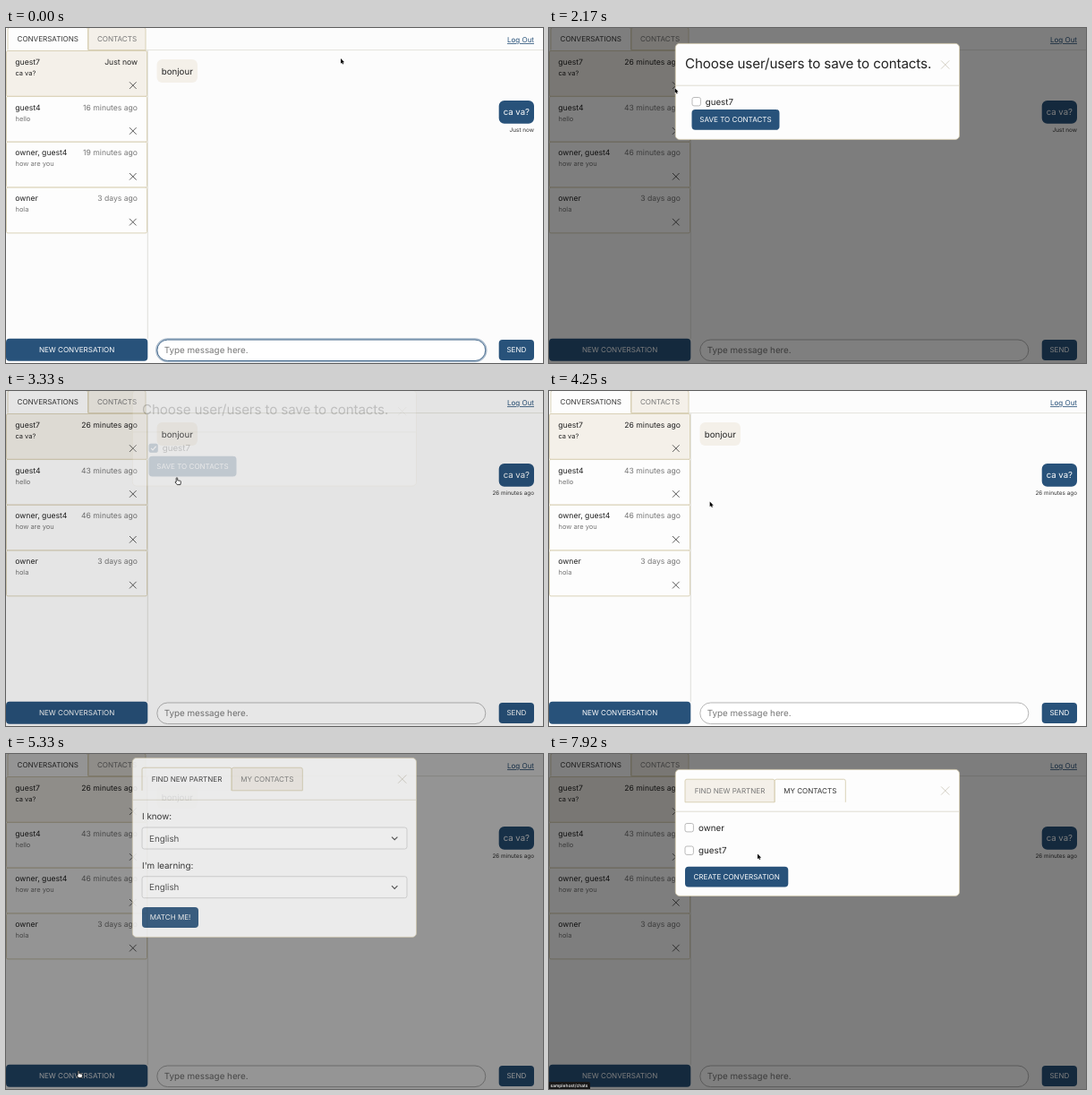
Animation, 600 px wide and 374 px high, one loop 8 s. Source, as an HTML page:

```html
<!DOCTYPE html>
<html lang="en">
<head>
<meta charset="utf-8">
<title>Chat</title>
<style>
  html, body { margin: 0; width: 100%; height: 100%; overflow: hidden; background: #fcfcfc; }
  svg { display: block; width: 100vw; height: 100vh; }
  text { font-family: Inter, "Open Sans", sans-serif; text-rendering: geometricPrecision; white-space: pre; }
</style>
</head>
<body>
<svg id="stage" viewBox="0 0 600 374"></svg>
<script>
const BLUE = '#28527a', BEIGE = '#f4f0e9', TAN = '#d6cdb0', WHITE = '#fdfdfd';
const INK = '#222', GREY = '#777';

// Markup helpers
const text = (x, y, size, str, fill = INK, extra = '') =>
  `<text x="${x}" y="${y}" font-size="${size}" fill="${fill}" ${extra}>${str}</text>`;
const END = 'text-anchor="end"', MIDDLE = 'text-anchor="middle"';
const box = (x, y, w, h, r, fill, stroke = 'none', extra = '') =>
  `<rect x="${x}" y="${y}" width="${w}" height="${h}" rx="${r}" fill="${fill}" stroke="${stroke}" ${extra}/>`;
const path = (d, stroke, width = 0.8, fill = 'none', extra = '') =>
  `<path d="${d}" stroke="${stroke}" stroke-width="${width}" fill="${fill}" ${extra}/>`;
const group = (id, body) => `<g id="${id}">${body}</g>`;
const cross = (x, y, r, color) =>
  path(`M${x - r} ${y - r}l${2 * r} ${2 * r}m0 ${-2 * r}l${-2 * r} ${2 * r}`, color);
const button = (x, y, w, h, label) =>
  box(x, y, w, h, 4, BLUE) + text(x + w / 2, y + h / 2 + 2.9, 8.05, label, '#fff', MIDDLE);
const checkbox = (x, y) => box(x, y, 9.4, 9.4, 2, '#fff', '#aaa', 'stroke-width=".8"');

function tab(x, y, w, h, label, active) {
  const outline = `M${x} ${y + h}V${y + 2}q0 -2 2 -2H${x + w - 2}q2 0 2 2V${y + h}`;
  return path(outline + (active ? '' : 'z'), TAN, 0.9, active ? WHITE : BEIGE) +
    text(x + w / 2, y + h / 2 + 2.9, 8.05, label, active ? '#333' : GREY, MIDDLE);
}

function conversation(i, name, message, before, after) {
  const y = 25.5 + i * 50.85, on = i === 0;
  const age = (cls, label) =>
    text(147, y + 15.2, 8.6, label, on ? INK : GREY, `${END} class="${cls}"`);
  return box(0.5, y, 157, 50.85, 1.5, on ? BEIGE : WHITE, TAN, 'stroke-width=".9"') +
    text(10.3, y + 15.2, 8.65, name) +
    text(10.5, y + 27.2, 7.45, message, on ? INK : GREY) +
    age('before', before) + age('after', after) +
    cross(141.8, y + 38.6, 3.8, '#333');
}

const page =
  box(0, 0, 600, 374, 0, '#fcfcfc') +
  path('M156 24.6H600', '#dedcd4') +
  path('M158.3 25V347', '#d9d8d2') +
  tab(2, -0.5, 89.5, 25, 'CONVERSATIONS', true) +
  tab(92, -0.5, 64, 25, 'CONTACTS', false) +
  text(590, 16, 8, 'Log Out', BLUE, END + ' text-decoration="underline"') +
  conversation(0, 'guest7', 'ca va?', 'Just now', '26 minutes ago') +
  conversation(1, 'guest4', 'hello', '16 minutes ago', '43 minutes ago') +
  conversation(2, 'owner, guest4', 'how are you', '19 minutes ago', '46 minutes ago') +
  conversation(3, 'owner', 'hola', '3 days ago', '3 days ago') +
  box(168.5, 35, 45.5, 26, 6, BEIGE) + text(173.8, 51.5, 9.7, 'bonjour') +
  box(550.7, 81, 39.3, 25.8, 6, BLUE) + text(570.3, 97.3, 9.6, 'ca va?', '#fff', MIDDLE) +
  text(590, 116, 6.4, 'Just now', '#333', END + ' id="sentNow"') +
  text(590, 116, 6.4, '26 minutes ago', '#333', END + ' id="sentAgo"') +
  button(0, 346.8, 158.3, 25, 'NEW CONVERSATION') +
  box(168.8, 348, 367, 23.6, 11.8, '#fff', '#b5b5b5') +
  group('focus',
    box(168.3, 347.5, 368, 24.6, 12.3, 'none', '#a9bacb', 'stroke-width="2.4"') +
    box(168.9, 348.1, 366.8, 23.4, 11.7, '#fff', BLUE, 'stroke-width=".8"')) +
  text(176.8, 363.4, 9.8, 'Type message here.', GREY) +
  button(550.7, 348, 39.3, 23, 'SEND');

const frame = h =>
  box(141.3, 17.4, 317.2, h, 4.5, WHITE, TAN, 'stroke-width=".8"') +
  path('M141.5 64.2H458.3', '#d9d5c6') + cross(442.7, 41, 4.6, '#c9c4b6');

const saveDialog = frame(107) +
  text(152, 44.6, 15.2, 'Choose user/users to save to contacts.', INK, 'letter-spacing="-.13"') +
  checkbox(160, 77.5) +
  group('checked', box(159.7, 77.2, 10, 10, 2, BLUE) +
    path('M162 82.3l2 2 3.6 -4.2', '#fff', 1.2)) +
  text(174.8, 85.7, 9.7, 'guest7') +
  button(159.5, 91, 98, 22.8, 'SAVE TO CONTACTS');

const select = y => box(152, y, 296, 24, 2.5, '#fff', '#ccc', 'stroke-width=".8"') +
  text(160, y + 15.6, 9.8, 'English', '#444') + path(`M431 ${y + 10.5}l3.2 3.2 3.2 -3.2`, '#444', 1.1);

const dialogTabs = first =>
  tab(152, 28.2, 100, 25.6, 'FIND NEW PARTNER', first) +
  tab(252.3, 28.2, 79, 25.6, 'MY CONTACTS', !first);

const contactRow = (y, name) => checkbox(152, y) + text(167, y + 8.4, 9.8, name);

const newDialog =
  group('partner', frame(200) + dialogTabs(true) +
    text(152, 86, 9.8, 'I know:') + select(95) +
    text(152, 140.7, 9.8, 'I\'m learning:') + select(149.7) +
    button(152, 184, 63, 23, 'MATCH ME!')) +
  group('contacts', frame(141) + dialogTabs(false) +
    contactRow(77.5, 'owner') + contactRow(103, 'guest7') +
    button(152, 125.7, 115.3, 22.8, 'CREATE CONVERSATION'));

const cursor =
  group('arrow', path('M0 0V5.7L1.3 4.5 2.2 6.5 3.2 6 2.3 4.2H4.1z', '#fff', 0.8, '#000',
    'paint-order="stroke"')) +
  group('hand', path('M-.8 4.6V.5a.75 .75 0 0 1 1.5 0V2.8L3.6 3.3q.9 .2 .8 1.2L3.9 7.6H.3L-1.9 5.1q-.2 -1.1 1.1 -.5z',
    '#111', 0.8, '#fff'));

const stage = document.getElementById('stage');
stage.innerHTML = page +
  box(0, 0, 600, 374, 0, '#000', 'none', 'id="shade"') +
  group('save', saveDialog) + group('create', newDialog) +
  group('status', box(-3, 366, 49, 12, 2, '#181818') +
    text(1.6, 372, 4.9, 'samplehost/chats', '#fff', 'font-weight="500"')) +
  group('cursor', cursor);

const el = id => document.getElementById(id);
const show = (node, on) => { node.style.display = on ? '' : 'none'; };
const clamp = v => Math.min(1, Math.max(0, v));

// cubic-bezier(0, 0, .58, 1)
function easeOut(x) {
  let lo = 0, hi = 1;
  for (let i = 0; i < 20; i++) {
    const s = (lo + hi) / 2;
    if (1.74 * s * s - 0.74 * s ** 3 < x) lo = s; else hi = s;
  }
  return 3 * lo * lo - 2 * lo ** 3;
}

// Fades in 250 ms, slides in 500 ms; returns the opacity
function dialog(id, t, open, close) {
  const part = (from, span) => clamp((t - from) / span);
  const alpha = part(open, 250) - part(close, 250);
  const shift = -31.7 * (1 - easeOut(part(open, 500)) + easeOut(part(close, 500)));
  const node = el(id);
  show(node, alpha > 0);
  node.setAttribute('opacity', alpha);
  node.setAttribute('transform', `translate(0 ${shift})`);
  return alpha;
}

// Pointer stops: time, x, y
const stops = [
  [0, 374, 34], [85, 374, 34], [670, 25, 42], [750, 25, 42], [1250, 29, 38], [1920, 29, 38],
  [2165, 140.5, 67], [2420, 164, 82], [2750, 164, 82], [3080, 191, 97], [4085, 191, 97],
  [4915, 81, 354], [5330, 81, 354], [5750, 281.5, 33], [5830, 280.3, 40.2], [6600, 280.3, 40.2],
  [7420, 239, 103], [7915, 233, 111.5], [8000, 233, 111.5]
];
const handTimes = [[2920, 3420], [4750, 5480], [5740, 6790]];

function pointer(t) {
  const i = stops.findIndex(s => s[0] > t);
  const [t0, x0, y0] = stops[i - 1], [t1, x1, y1] = stops[i];
  const u = (t - t0) / (t1 - t0), e = u * u * (3 - 2 * u);
  el('cursor').setAttribute('transform', `translate(${x0 + (x1 - x0) * e} ${y0 + (y1 - y0) * e})`);
  const hand = handTimes.some(([a, b]) => t >= a && t < b);
  show(el('hand'), hand);
  show(el('arrow'), !hand);
}

function draw(now) {
  const t = Math.floor((now % 8000 + 4) * 0.012) / 0.012 % 8000;
  const later = t > 160;
  document.querySelectorAll('.before').forEach(n => show(n, !later));
  document.querySelectorAll('.after').forEach(n => show(n, later));
  show(el('focus'), !later);
  show(el('sentNow'), t < 3130);
  show(el('sentAgo'), t >= 3130);
  show(el('checked'), t >= 2570);
  show(el('partner'), t < 6080);
  show(el('contacts'), t >= 6080);
  show(el('status'), t >= 5990);
  const dim = dialog('save', t, 1325, 3130) + dialog('create', t, 5125, 9000);
  el('shade').setAttribute('opacity', dim / 2);
  pointer(t);
}

function tick() {
  draw(performance.now());
  requestAnimationFrame(tick);
}
tick();
</script>
</body>
</html>
```
